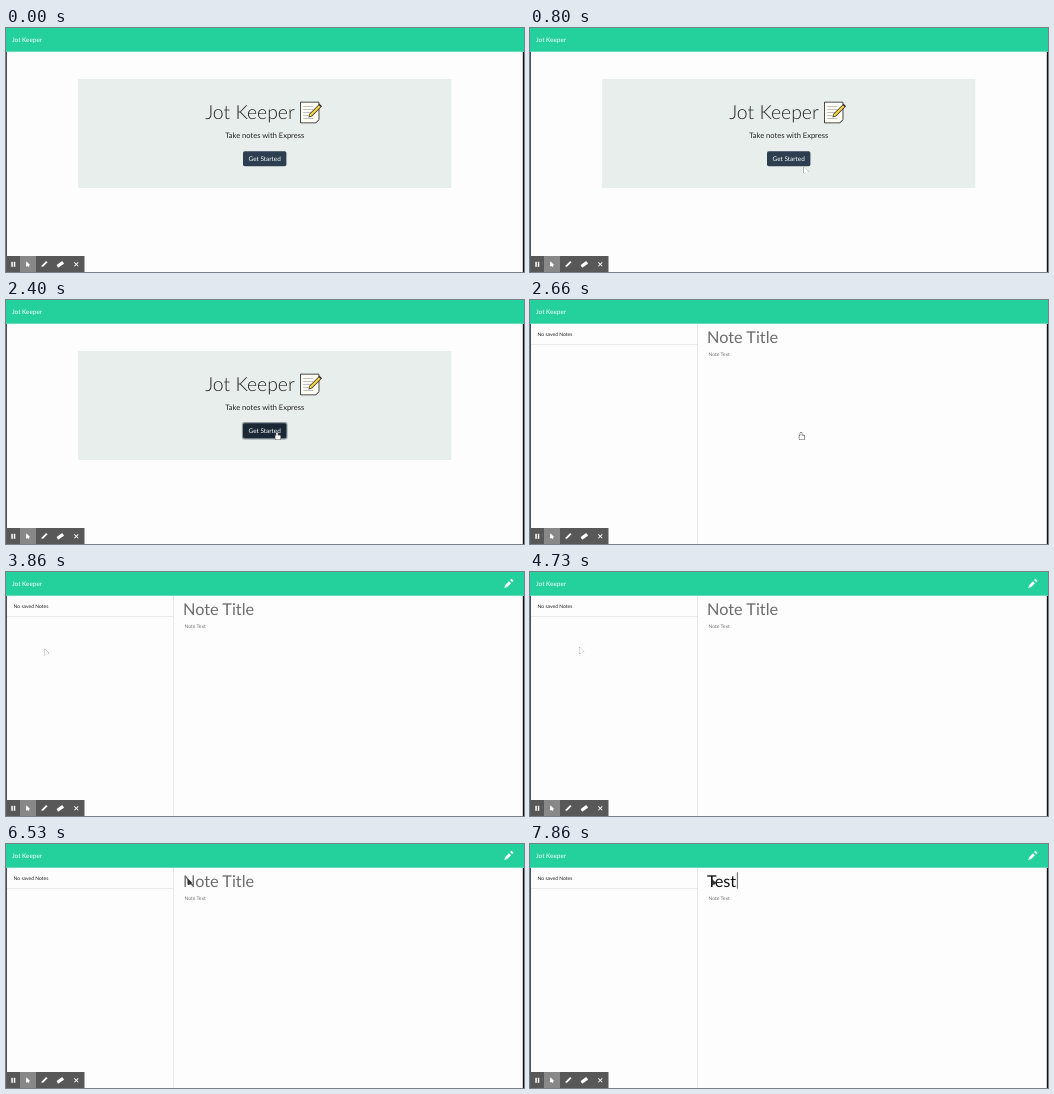
Write an HTML page with a canvas that moves like this. It is 518 px wide and 244 px high and loops after 8000 ms.

```html
<!DOCTYPE html>
<html lang="en">
<head>
<meta charset="utf-8">
<title>Jot Keeper</title>
<style>
html, body { margin: 0; width: 100%; height: 100%; overflow: hidden; background: #fdfdfd; }
canvas { display: block; width: 518px; height: 244px; }
</style>
</head>
<body>
<canvas id="stage"></canvas>
<script>
const W = 518, H = 244, LOOP = 8000, BAR = 23.7;
const APP = 'Jot Keeper';
const DIAGONAL = -Math.PI / 4;
const canvas = document.getElementById('stage');
const dpr = window.devicePixelRatio || 1;
canvas.width = W * dpr;
canvas.height = H * dpr;
const ctx = canvas.getContext('2d');

function rect(x, y, w, h, fill) {
  ctx.fillStyle = fill;
  ctx.fillRect(x, y, w, h);
}

function rounded(x, y, w, h, r, fill, stroke) {
  ctx.beginPath();
  ctx.roundRect(x, y, w, h, r);
  paint(fill, stroke);
}

function paint(fill, stroke, width = 0.7) {
  ctx.lineJoin = 'round';
  ctx.lineWidth = width;
  if (stroke) { ctx.strokeStyle = stroke; ctx.stroke(); }
  if (fill) { ctx.fillStyle = fill; ctx.fill(); }
}

function polygon(points, fill, stroke, width) {
  ctx.beginPath();
  points.forEach(([x, y]) => ctx.lineTo(x, y));
  ctx.closePath();
  paint(fill, stroke, width);
}

function at(x, y, angle, drawPart) {
  ctx.save();
  ctx.translate(x, y);
  ctx.rotate(angle);
  drawPart();
  ctx.restore();
}

function text(str, x, y, size, fill, align = 'left', weight = 400) {
  ctx.font = `${weight} ${size}px Lato, sans-serif`;
  ctx.textRendering = 'geometricPrecision';
  ctx.textAlign = align;
  ctx.fillStyle = fill;
  ctx.fillText(str, x, y);
}

function arrow({ x, y }, fill = '#fff', stroke = '#777', size = 6) {
  at(x, y, 0, () => {
    const head = [[0, 0], [0, size], [size * 0.7, size * 0.7]];
    const tail = () => rect(-size / 10, size / 2, size / 5, size * 0.65, fill);
    polygon(head, fill, stroke, 1);
    at(0, 0, -0.42, tail);
    polygon(head, fill);
  });
}

function hand({ x, y }) {
  const parts = [[1.3, 0.6, 1.4, 5], [0.4, 3.4, 5, 4]];
  parts.forEach(p => rounded(...p, 0.7, null, '#555'));
  parts.forEach(p => rounded(...p, 0.7, '#fff'));
  function rounded(px, py, w, h, r, fill, stroke) {
    ctx.beginPath();
    ctx.roundRect(x + px, y + py, w, h, r);
    paint(fill, stroke, 1.2);
  }
}

// The tip lies at (x, y) and the body runs up to the right
function pencil(x, y, length, thick, fill) {
  const r = thick / 2;
  at(x, y, DIAGONAL, () =>
    polygon([[0, 0], [thick, -r], [length, -r], [length, r], [thick, r]], fill));
}

function memo() {
  const left = 294.8, top = 74.4, right = 312.6, bottom = 94.4, cut = 3;
  polygon([[left, top], [right, top], [right, bottom - cut], [right - cut, bottom], [left, bottom]],
    '#fdfcf5', '#161616', 1.5);
  for (let i = 0; i < 5; i++) rect(left + 2.4, top + 3.6 + i * 3, 10, 0.7, '#aaa');
  pencil(302.4, 89.4, 17.5, 3.6, '#222');
  pencil(303.2, 88.6, 15, 2.4, '#f5cf45');
}

function header(showPen) {
  rect(0, 0, W, BAR, '#24d19d');
  text(APP, 6, 14, 6.4, '#fff');
  if (showPen) {
    pencil(498.2, 16, 8.2, 2.9, '#fff');
    at(505.1, 9.1, DIAGONAL, () => rect(0, -1.45, 2, 2.9, '#fff'));
  }
}

function welcome(t) {
  const mid = 258.7;
  rect(72, 51, 373.3, 109, '#e8eeec');
  text(APP, 244, 91, 19.4, '#222', 'center', 300);
  memo();
  text('Take notes with Express', mid, 110.2, 7.55, '#222', 'center');
  if (t >= 1600) rounded(235.9, 122, 45.6, 17.4, 2.5, '#8d989f');
  rounded(237, 123.2, 43.4, 15, 1.8, t >= 1400 ? '#1a2835' : '#2c3e50');
  text('Get Started', mid, 133, 6.4, '#fff', 'center');
}

function notes(t) {
  rect(1, 44, 166.5, 0.8, '#e6e6e6');
  rect(167, BAR, 0.8, H - BAR, '#e2e2e2');
  text('No saved Notes', 7.6, 36.3, 5, '#222');

  const title = 'Test'.slice(0, Math.max(0, 1 + Math.floor((t - 7200) / 220)));
  text(title || 'Note Title', 177, 42.8, 16.3, title ? '#111' : '#6d6d6d');
  const blinkOn = Math.floor((t - 6000) / 530) % 2 === 0;
  if (t >= 6000 && (title || blinkOn)) {
    rect(177.8 + ctx.measureText(title).width, 28.3, 0.7, 16.4, '#222');
  }
  text('Note Text', 178.4, 55.6, 5, '#777');
}

function toolbar() {
  const y = 236.3;
  rect(0, 228, 78.5, 16, '#585858');
  rect(14, 228, 16, 16, '#888');
  for (const x of [5.3, 7.8]) rect(x, y - 2.5, 1.5, 5, '#fff');
  arrow({ x: 20.4, y: y - 2.8 }, '#fff', null, 5);
  pencil(35.4, y + 2.8, 7.8, 1.8, '#fff');
  at(54.3, y, DIAGONAL * 0.8, () => rounded(-3.6, -1.6, 7.2, 3.2, 0.7, '#fff'));
  for (const turn of [1, -1]) {
    at(70.3, y, turn * DIAGONAL, () => rect(-2.8, -0.45, 5.6, 0.9, '#fff'));
  }
}

// Eased travel between two points, lifted by an optional arch
function glide(t, start, end, from, to, arch = 0) {
  const k = Math.min(1, Math.max(0, (t - start) / (end - start)));
  const e = k * k * (3 - 2 * k);
  return {
    x: from.x + (to.x - from.x) * e,
    y: from.y + (to.y - from.y) * e - arch * Math.sin(Math.PI * e)
  };
}

const spot = {
  edge: { x: 512, y: 152 },
  below: { x: 274, y: 139 },
  button: { x: 269, y: 132 },
  sidebar: { x: 38.5, y: 77 },
  body: { x: 174, y: 56 },
  title: { x: 182, y: 35.5 }
};

function pointer(t) {
  if (t < 260) return;
  if (t < 1330) arrow(glide(t, 260, 800, spot.edge, spot.below));
  else if (t < 3600) hand(glide(t, 1330, 1460, spot.below, spot.button));
  else if (t < 4600) arrow(glide(t, 3600, 3860, spot.button, spot.sidebar, 45));
  else if (t < 5500) arrow(glide(t, 4600, 5350, spot.sidebar, spot.body));
  else if (t >= 6000) arrow(spot.title, '#333', '#222', 5);
}

function draw(t) {
  ctx.setTransform(dpr, 0, 0, dpr, 0, 0);
  rect(0, 0, W, H, '#fdfdfd');
  rect(0, BAR, 0.8, H, '#222');
  rect(W - 1.2, BAR, 1.2, H, '#111');
  header(t >= 2730);
  if (t < 2660) welcome(t);
  else notes(t);
  toolbar();
  pointer(t);
}

const start = performance.now();
function tick() {
  draw((performance.now() - start) % LOOP);
  requestAnimationFrame(tick);
}
tick();
</script>
</body>
</html>
```
